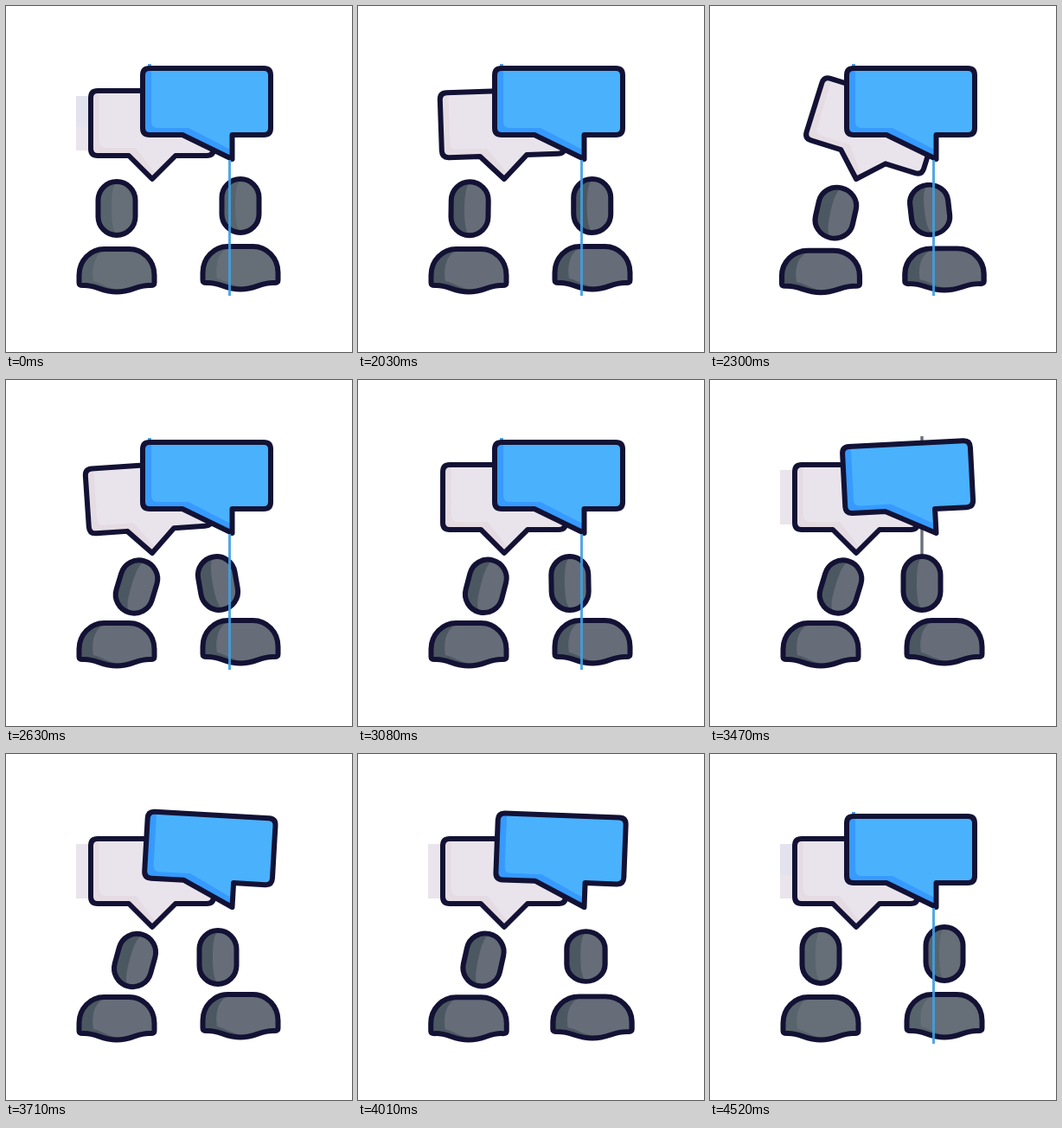
Write an HTML page that moves like this. It is 400x400 px and loops after 4550 ms.

```html
<!DOCTYPE html>
<html lang="en">
<head>
<meta charset="utf-8">
<title>Conversation</title>
<style>
  html, body { margin: 0; width: 100%; height: 100%; overflow: hidden; background: #fff; }
  svg { display: block; width: 100%; height: 100%; }
  .ink { fill: none; stroke: #131235; stroke-width: 6; stroke-linejoin: round; }
  .skin { fill: #666d79; }
  .shade { fill: #4c5861; }
  .rest .skin { fill: #666f78; }
  .rest .shade { fill: #58646b; }
</style>
</head>
<body>
<svg viewBox="0 0 400 400">
  <defs>
    <path id="head" d="M-21.5 -9.5a21.5 21.5 0 0 1 43 0v19a21.5 21.5 0 0 1 -43 0z"/>
    <path id="headShade" d="M0 -31C-12 -31 -21.5 -21 -21.5 -9.5v19C-21.5 21 -12 31 0 31C-5 25 -6 14 -6 0S-5 -25 0 -31z"/>
    <path id="body" d="M-43.5 -20A29 30 0 0 1 -14.5 -50H14.5A29 30 0 0 1 43.5 -20V-11Q43.5 -8 39 -8C24 -9 18 -.5 0 -.5S-24 -9 -39 -8Q-43.5 -8 -43.5 -11z"/>
    <path id="bodyShade" d="M-14.5 -50A29 30 0 0 0 -43.5 -20V-11Q-43.5 -8 -39 -8C-24 -9 -18 -.5 0 -.5L8 -3C-10 -3 -16 -11 -27 -13C-29 -28 -27 -43 -12 -50z"/>
    <path id="grey" d="M106 98H232q8 0 8 8V165q0 8 -8 8H196L169 200L142 173H106q-8 0 -8 -8V106q0 -8 8 -8z"/>
    <path id="blue" d="M166 72H298q8 0 8 8V141q0 8 -8 8H261.5V177L204 149H166q-8 0 -8 -8V80q0 -8 8 -8z"/>
    <g id="headArt"><use href="#head" class="skin"/><use href="#headShade" class="shade"/><use href="#head" class="ink"/></g>
    <g id="bodyArt"><use href="#body" class="skin"/><use href="#bodyShade" class="shade"/><use href="#body" class="ink"/></g>
  </defs>
  <g id="strip">
    <path fill="#eae4ec" d="M81 104h15v63h-15z"/>
    <path id="stripTint" fill="#e2e3ee" d="M81 104h15v36h-15z"/>
  </g>
  <g id="greyBubble">
    <use href="#grey" fill="#e9e4ec"/>
    <path fill="#e5dce3" d="M98 106q0 -8 8 -8h2V157q0 7 7 7H150L174 195L169 200L142 173H106q-8 0 -8 -8z"/>
    <use href="#grey" class="ink"/>
  </g>
  <path id="greyLine" fill="#696f7b" d="M243.3 65h3.4V202h-3.4z"/>
  <path id="blueTick" fill="#4b9fd8" d="M164 67h4v5h-4z"/>
  <g id="blueBubble">
    <use href="#blue" fill="#4ab1fd"/>
    <path fill="#369aff" d="M158 80q0 -8 8 -8h2V134q0 7 7 7H211L261.5 167V177L204 149H166q-8 0 -8 -8z"/>
    <use href="#blue" class="ink"/>
  </g>
  <use id="leftBody" href="#bodyArt"/>
  <use id="rightBody" href="#bodyArt"/>
  <use id="leftHead" href="#headArt"/>
  <use id="rightHead" href="#headArt"/>
  <path id="blueLine" fill="#429fe0" fill-opacity=".9" d="M257 178h3V335h-3z"/>
</svg>
<script>
const LOOP = 4550, START = 2030, END = 4520, STEP = 30;
const GREY_START = 2000, BLUE_START = 3080, SWING = 1110;
const { sin, cos, PI, floor, min, max } = Math;

const $ = id => document.getElementById(id);
const place = (id, transform) => $(id).setAttribute('transform', transform);
const show = (id, on) => $(id).style.display = on ? '' : 'none';

function ease(t, from, to) {
  const u = min(1, max(0, (t - from) / (to - from)));
  return u * u * (3 - 2 * u);
}

// Rises to 1, holds, and falls back to 0.
const hold = (t, inFrom, inTo, outFrom, outTo) => ease(t, inFrom, inTo) - ease(t, outFrom, outTo);
const bump = (t, from, to) => sin(PI * min(1, max(0, (t - from) / (to - from)))) ** 2;

// A wobble that gets faster while it fades out.
function swing(t) {
  const x = min(1, max(0, t / SWING));
  return -130 * x * (1 - x) ** 2 * sin(PI * (.72 + 2.86 * x + 1.76 * x * x));
}

function drawPerson(side, head, tilt, bodyX, bodyY, squash) {
  place(side + 'Head', `translate(${head.x} ${head.y + 2 * squash}) rotate(${tilt}) scale(${1 + .03 * squash} ${1 - .07 * squash})`);
  place(side + 'Body', `translate(${bodyX} ${bodyY + squash}) scale(${1 + .05 * squash} ${1 - .03 * squash})`);
}

function draw(t) {
  const rest = t < START || t >= END;
  const time = rest ? 0 : START + floor((t - START) / STEP) * STEP;
  const greyRest = time < START || time >= GREY_START + SWING;
  const blueRest = time <= BLUE_START || time >= BLUE_START + SWING;

  document.querySelector('svg').classList.toggle('rest', rest);
  show('strip', greyRest);
  show('stripTint', rest);
  show('blueLine', blueRest);
  show('blueTick', blueRest);
  show('greyLine', time > BLUE_START && time < 3650);

  place('greyBubble', `rotate(${swing(time - GREY_START)} 169 200)`);
  place('blueBubble', `rotate(${-.85 * swing(time - BLUE_START)} 261 177)`);

  const nod = .93 + .07 * cos(2 * PI * (time - 2630) / 840);
  const left = nod * hold(time, 1970, 2400, 3860, 4440);
  const right = hold(time, 2000, 2500, 3720, 4170);
  const rightTilt = -10 * hold(time, 2000, 2500, 2600, 3200);
  drawPerson('left', { x: 128 + 23 * left, y: 234 + 5 * left }, 17 * left, 128, 331,
    bump(time, 2030, 2420) + bump(time, 3960, 4400));
  drawPerson('right', { x: 271 - 26 * right, y: 231 + 4 * right }, rightTilt, 271, 328,
    bump(time, 2060, 2500) + bump(time, 3760, 4200));
}

function tick() {
  draw(performance.now() % LOOP);
  requestAnimationFrame(tick);
}
tick();
</script>
</body>
</html>
```
